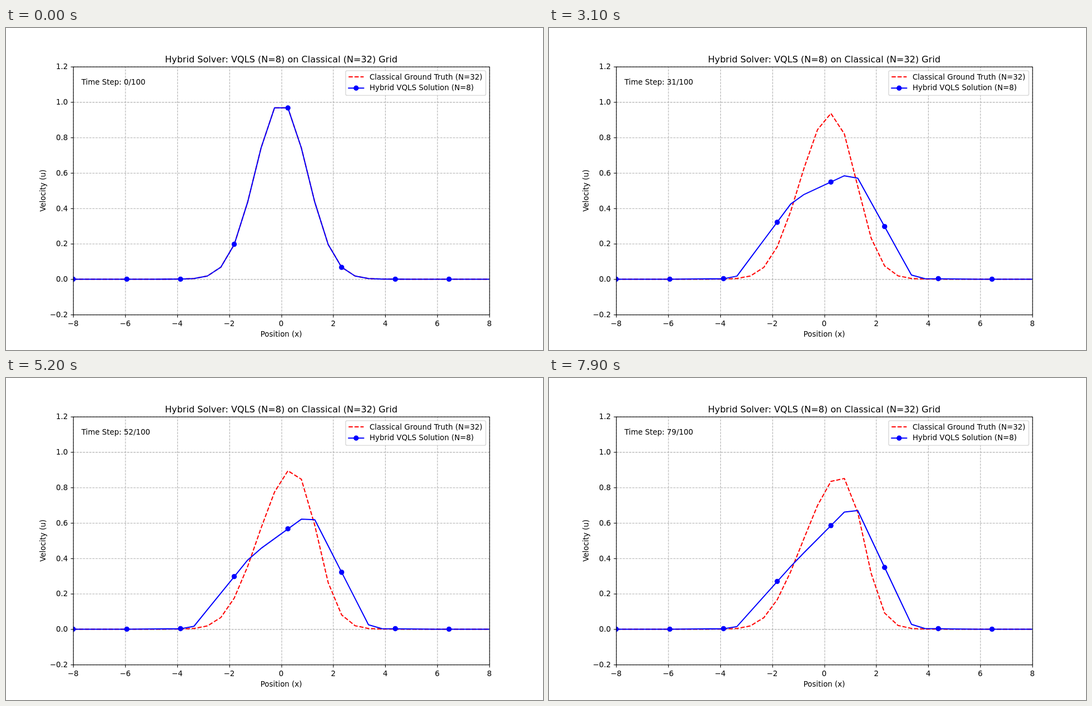
Animation, 966 px wide and 580 px high, one loop 8 s. Source, as an HTML page with a canvas:

```html
<!DOCTYPE html>
<html>
<head>
<meta charset="utf-8">
<style>
  html, body { margin: 0; width: 100%; height: 100%; overflow: hidden; background: #fff; }
  canvas { display: block; }
</style>
</head>
<body>
<canvas id="plot" width="966" height="580"></canvas>
<script>
// The figure is laid out on 1000 x 600 units at 100 dpi and scaled to the stage
const ctx = document.getElementById('plot').getContext('2d');
ctx.scale(966 / 1000, 580 / 600);

const PT = 100 / 72;
const box = { l: 125, r: 900, t: 72, b: 534 };
const px = x => box.l + (x + 8) * (box.r - box.l) / 16;
const py = u => box.b - (u + 0.2) * (box.b - box.t) / 1.4;
const snap = v => Math.floor(v + 0.5) + 0.5;
const frame = { l: snap(box.l), r: snap(box.r), t: snap(box.t), b: snap(box.b) };

const STEPS = 80, N = 32, DX = 16 / (N - 1), DT = 0.01, NU = 0.01;
const grid = Array.from({ length: N }, (_, i) => -8 + i * DX);

// Burgers equation on the fine grid: upwind advection plus diffusion
const classical = [grid.map(x => Math.exp(-x * x / 2))];
for (let n = 1; n < STEPS; n++) {
  const u = classical[n - 1];
  classical.push(u.map((v, i) => i === 0 || i === N - 1 ? 0 :
    v - DT * v * (v - u[i - 1]) / DX + DT * NU * (u[i + 1] - 2 * v + u[i - 1]) / DX ** 2));
}

// Eight coarse nodes, linearly interpolated onto the fine grid
function hybrid(n) {
  if (n === 0) return classical[0];
  const t = n * DT;
  const nodes = [0, 0, 0.0028, 0.5204 / (1 + 0.478 * t),
    0.5204 + 0.311 * t - 0.081 * t * t, 0.0028 + 0.002 * t, 0, 0];
  return grid.map(x => {
    const s = (x + 8) * 7 / 16, k = Math.min(6, Math.floor(s));
    return nodes[k] + (nodes[k + 1] - nodes[k]) * (s - k);
  });
}

// Width in points; dash lengths are multiples of the line width
function line(points, color, width, dashed = false, cap = 'butt') {
  const w = width * PT;
  ctx.strokeStyle = color;
  ctx.lineWidth = w;
  ctx.lineCap = cap;
  ctx.lineJoin = 'round';
  ctx.setLineDash(dashed ? [3.7 * w, 1.6 * w] : []);
  ctx.beginPath();
  points.forEach(([x, y]) => ctx.lineTo(x, y));
  ctx.stroke();
  ctx.setLineDash([]);
}

function text(str, x, y, align = 'left', size = 10) {
  ctx.fillStyle = '#000';
  ctx.font = size * PT + 'px "DejaVu Sans", sans-serif';
  ctx.textAlign = align;
  ctx.fillText(str, x, y);
}

function dot(x, y) {
  ctx.fillStyle = '#00f';
  ctx.beginPath();
  ctx.arc(Math.round(x), Math.round(y), 3.5 * PT, 0, 7);
  ctx.fill();
}

const redLine = pts => line(pts, '#f00', 1.5, true);
const blueLine = pts => line(pts, '#00f', 1.5, false, 'square');
const label = (v, digits) => v.toFixed(digits).replace('-', '\u2212');
const xTicks = Array.from({ length: 9 }, (_, i) => -8 + 2 * i);
const yTicks = Array.from({ length: 8 }, (_, i) => (i - 1) / 5);

function drawGrid() {
  const rule = pts => line(pts, '#b0b0b0', 0.8, true);
  for (const v of xTicks) rule([[snap(px(v)), frame.b], [snap(px(v)), frame.t]]);
  for (const v of yTicks) rule([[frame.l, snap(py(v))], [frame.r, snap(py(v))]]);
}

function drawAxes() {
  const { l, r, t, b } = frame, tick = 3.5 * PT;
  for (const v of xTicks) {
    const x = snap(px(v));
    line([[x, b], [x, b + tick]], '#000', 0.8);
    text(label(v, 0), px(v), 555, 'center');
  }
  for (const v of yTicks) {
    const y = snap(py(v));
    line([[l, y], [l - tick, y]], '#000', 0.8);
    text(label(v, 1), box.l - 7 * PT, Math.round(py(v)) + 5, 'right');
  }
  ctx.lineWidth = 0.8 * PT;
  ctx.lineJoin = 'miter';
  ctx.strokeRect(l, t, r - l, b - t);

  text('Hybrid Solver: VQLS (N=8) on Classical (N=32) Grid', 512.5, 64, 'center', 12);
  text('Position (x)', 512.5, 575, 'center');
  ctx.save();
  ctx.translate(73, 303);
  ctx.rotate(-Math.PI / 2);
  text('Velocity (u)', 0, 0, 'center');
  ctx.restore();
}

function drawLegend() {
  ctx.beginPath();
  ctx.roundRect(632.5, 79.5, 261, 46, 2 * PT);
  ctx.fillStyle = 'rgba(255,255,255,0.8)';
  ctx.fill();
  ctx.strokeStyle = 'rgba(204,204,204,0.8)';
  ctx.lineWidth = PT;
  ctx.stroke();
  redLine([[638, 91], [666, 91]]);
  blueLine([[638, 112], [666, 112]]);
  dot(652, 112);
  text('Classical Ground Truth (N=32)', 677, 96);
  text('Hybrid VQLS Solution (N=8)', 677, 116);
}

function draw(n) {
  const toPoints = u => u.map((v, i) => [px(grid[i]), py(v)]);
  ctx.fillStyle = '#fff';
  ctx.fillRect(0, 0, 1000, 600);
  drawGrid();

  ctx.save();
  ctx.beginPath();
  ctx.rect(box.l, box.t, box.r - box.l, box.b - box.t);
  ctx.clip();
  redLine(toPoints(classical[n]));
  const blue = toPoints(hybrid(n));
  blueLine(blue);
  blue.forEach(([x, y], i) => { if (i % 4 === 0) dot(x, y); });
  ctx.restore();

  drawAxes();
  text(`Time Step: ${n}/100`, 140.5, 106);
  drawLegend();
}

let start, shown = -1;
function tick(now) {
  start ??= now;
  const n = Math.floor((now - start) / 100) % STEPS;
  if (n !== shown) draw(shown = n);
  requestAnimationFrame(tick);
}
requestAnimationFrame(tick);
</script>
</body>
</html>
```
